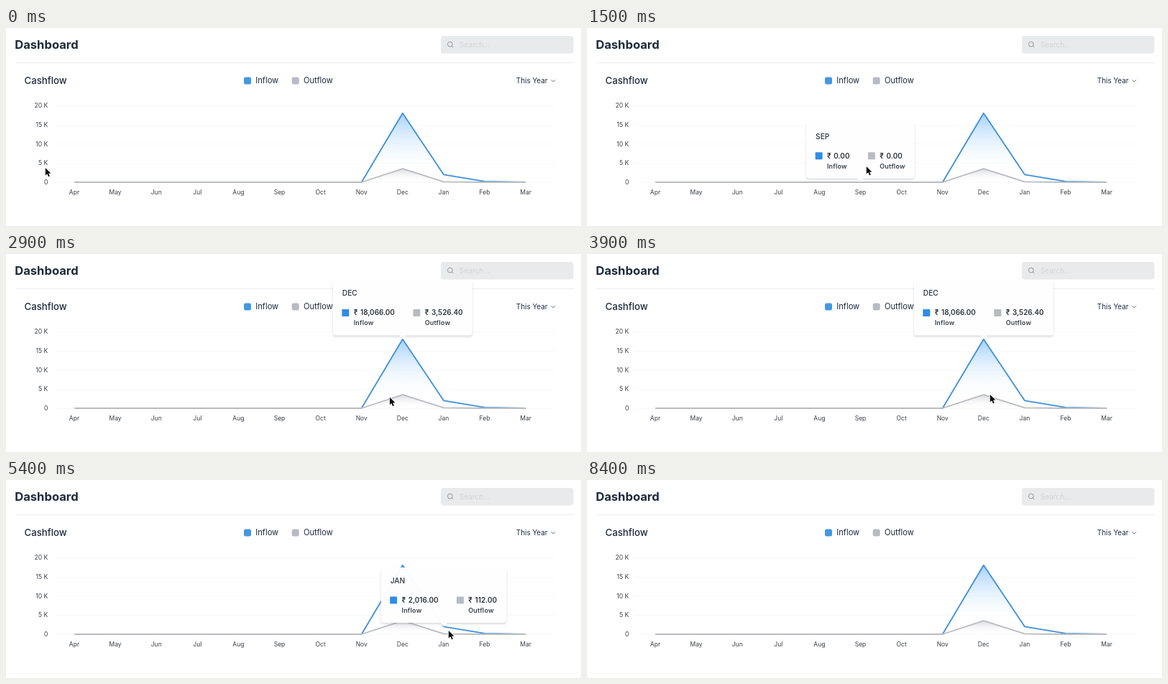
An HTML page with a canvas that plays this animation: 800x276 px, repeating every 8500 ms.

```html
<!DOCTYPE html>
<html lang="en">
<head>
<meta charset="utf-8">
<title>Dashboard</title>
<style>
  html, body { margin: 0; width: 100%; height: 100%; overflow: hidden; background: #fff; }
  canvas { display: block; width: 800px; height: 276px; }
</style>
</head>
<body>
<canvas id="stage"></canvas>
<script>
const W = 800, H = 276, LOOP = 8500, STEP = 100;
const BLUE = '#4398e0', GRAY = '#b8bbc1', INK = '#1d2b3c', AXIS = '#3a3f46', TIP = '#2c3138';
const canvas = document.getElementById('stage');
const ctx = canvas.getContext('2d');
const ratio = window.devicePixelRatio || 1;
canvas.width = W * ratio;
canvas.height = H * ratio;

const months = 'Apr May Jun Jul Aug Sep Oct Nov Dec Jan Feb Mar'.split(' ');
const yearOf = sums => months.map(m => sums[m] || 0);
const inflow = yearOf({ Dec: 18066, Jan: 2016, Feb: 224 });
const outflow = yearOf({ Dec: 3526.4, Jan: 112 });
const LEFT = 95, BASE = 215, GAP = 57.1;
const px = i => LEFT + GAP * i;
const py = v => BASE - v * 106.5 / 20000;

// Where the pointer turns or changes speed: seconds, x, y
const path = [
  [0, 54, 194], [0.9, 178, 192], [1, 228, 189], [1.5, 388, 192], [2, 481, 193],
  [2.6, 525, 200], [3.9, 560, 195], [4.4, 583, 208], [5.4, 615, 209], [6, 659, 217],
  [6.7, 667, 204], [7.1, 680, 206], [7.6, 758, 207], [8.5, 817, 208]
];

function pointerAt(t) {
  const n = path.findIndex(k => k[0] > t);
  const [t0, x0, y0] = path[n - 1], [t1, x1, y1] = path[n];
  const p = (t - t0) / (t1 - t0);
  return [x0 + (x1 - x0) * p, y0 + (y1 - y0) * p];
}

function font(size, weight, spacing = 0, words = 0) {
  ctx.font = `${weight} ${size}px Inter, sans-serif`;
  ctx.letterSpacing = spacing + 'px';
  ctx.wordSpacing = words + 'px';
}

const valueFont = () => font(9.9, 600, 0, 1.3);
const nameFont = () => font(9, 600, 0.2);

function write(str, x, y, color, align = 'left') {
  ctx.fillStyle = color;
  ctx.textAlign = align;
  ctx.fillText(str, x, y);
}

function text(str, x, y, size, weight = 400, color = INK, align) {
  font(size, weight);
  write(str, x, y, color, align);
}

function box(x, y, w, h, r, color) {
  ctx.fillStyle = color;
  ctx.beginPath();
  ctx.roundRect(x, y, w, h, r);
  ctx.fill();
}

function trace(points) {
  ctx.beginPath();
  points.forEach(([x, y]) => ctx.lineTo(x, y));
}

function stroke(points, color, width) {
  ctx.strokeStyle = color;
  ctx.lineWidth = width;
  trace(points);
  ctx.stroke();
}

function header() {
  text('Dashboard', 12.2, 28.7, 16.6, 700);
  box(605, 11, 184.5, 24.5, 4, '#e9eaeb');
  ctx.strokeStyle = '#878c93';
  ctx.lineWidth = 0.9;
  ctx.beginPath();
  ctx.arc(617.8, 22.6, 3.4, 0, Math.PI * 2);
  ctx.moveTo(620.3, 25.1);
  ctx.lineTo(622.3, 27.1);
  ctx.stroke();
  text('Search...', 630.8, 26.9, 10.1, 400, '#d2d4d7');
  box(13, 48, 777, 1, 0, '#eaebee');
}

function key(x, name, color) {
  box(x, 68.5, 10, 10, 2.5, color);
  text(name, x + 16.3, 77.4, 11.1);
}

function legend() {
  text('Cashflow', 25.6, 78.4, 13.2, 500);
  key(331, 'Inflow', BLUE);
  key(397.7, 'Outflow', GRAY);
  text('This Year', 709.8, 77, 9.9);
  stroke([[758.6, 72.3], [761.3, 75], [764, 72.3]], '#5d6672', 1);
}

function series(values, color, tint, fade) {
  const points = values.map((v, i) => [px(i), py(v)]);
  const fill = ctx.createLinearGradient(0, py(Math.max(...values)), 0, fade);
  fill.addColorStop(0, tint);
  fill.addColorStop(1, 'rgba(255,255,255,0)');
  ctx.fillStyle = fill;
  trace(points);
  ctx.fill();
  stroke(points, color, 1.8);
}

function chart() {
  for (let k = 0; k <= 20; k += 5) {
    const y = py(k * 1000);
    box(66, Math.floor(y), 699, 1, 0, '#f8f9f9');
    text(k ? k + ' K' : '0', 58.3, y + 2.9, 8.6, 400, AXIS, 'right');
  }
  months.forEach((m, i) => text(m, px(i), 231.6, 8.5, 400, AXIS, 'center'));
  series(inflow, '#3f90d8', '#a3d0fb', 200);
  series(outflow, '#b9bbc0', '#dadbe0', BASE);
}

function rupees(v) {
  return '₹ ' + v.toLocaleString('en-US', { minimumFractionDigits: 2, maximumFractionDigits: 2 });
}

function tooltip(i) {
  const cx = px(i), bottom = py(inflow[i]) - 5.2, h = 77;
  const a = rupees(inflow[i]), b = rupees(outflow[i]);
  nameFont();
  const nameWidth = ctx.measureText('Outflow').width;
  valueFont();
  const second = 29 + ctx.measureText(a).width + 25.3;
  const w = second + 16.5 + Math.max(ctx.measureText(b).width, nameWidth) + 13;
  const left = Math.min(Math.max(cx - w / 2, 26), 774 - w);

  ctx.save();
  ctx.shadowColor = 'rgba(30,40,60,0.18)';
  ctx.shadowBlur = 3 * ratio;
  ctx.shadowOffsetY = 1.8 * ratio;
  box(left, bottom - h, w, h, 4, 'rgba(255,255,255,0.97)');
  ctx.restore();
  ctx.fillStyle = '#fff';
  trace([[cx - 5, bottom], [cx + 5, bottom], [cx, bottom + 5]]);
  ctx.fill();

  text(months[i].toUpperCase(), left + 13, bottom - 55.3, 10.2, 500, TIP);
  const column = (x, color, value, name) => {
    box(x, bottom - 36.6, 10, 10, 1, color);
    valueFont();
    write(value, x + 16.3, bottom - 28.2, TIP);
    nameFont();
    write(name, x + 16.3, bottom - 14.2, '#3c424a');
  };
  column(left + 12.5, '#2f8de6', a, 'Inflow');
  column(left + second, GRAY, b, 'Outflow');
}

function pointer(x, y) {
  ctx.save();
  ctx.translate(x + 0.8, y + 0.9);
  ctx.scale(0.9, 0.9);
  trace([[0, 0], [0, 11.8], [2.7, 9.3], [4.7, 13.8], [6.7, 12.9], [4.8, 8.6], [8.4, 8.4]]);
  ctx.closePath();
  ctx.strokeStyle = '#fff';
  ctx.lineWidth = 1.8;
  ctx.stroke();
  ctx.fillStyle = '#0b0b0b';
  ctx.fill();
  ctx.restore();
}

function draw(t) {
  ctx.setTransform(ratio, 0, 0, ratio, 0, 0);
  ctx.lineJoin = 'round';
  ctx.fillStyle = '#fff';
  ctx.fillRect(0, 0, W, H);
  header();
  legend();
  chart();
  const [x, y] = pointerAt(t);
  if (x > 66 && x < W) {
    const nearest = Math.round((x - LEFT) / GAP);
    tooltip(Math.min(Math.max(nearest, 0), months.length - 1));
  }
  pointer(x, y);
}

const start = performance.now();
function tick() {
  const t = (performance.now() - start) % LOOP;
  draw(Math.floor(t / STEP) * STEP / 1000);
  requestAnimationFrame(tick);
}
tick();
</script>
</body>
</html>
```
